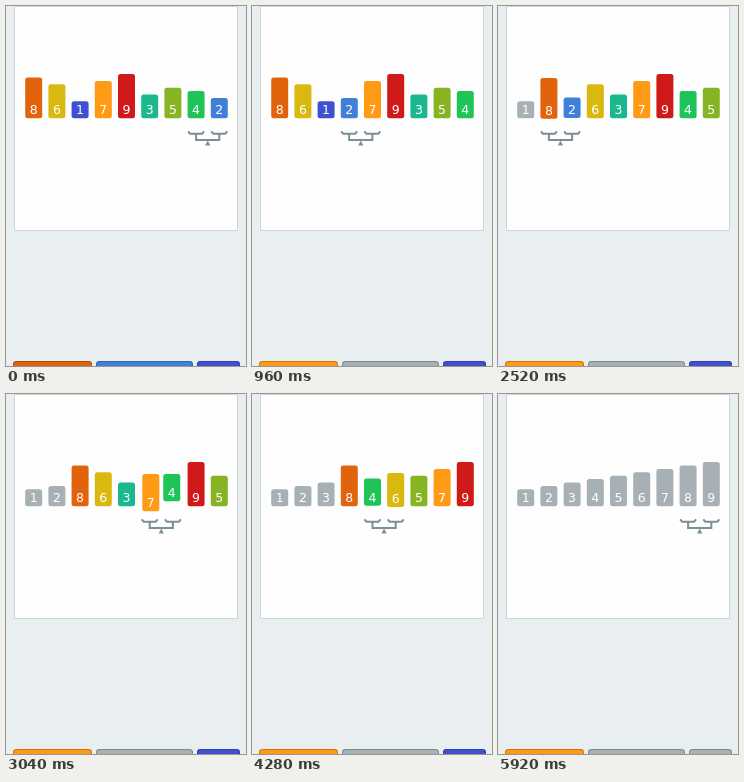
An HTML page with a canvas that plays this animation: 240 px wide and 360 px high, repeating every 6.52 s.

```html
<!DOCTYPE html>
<html lang="en">
<head>
<meta charset="utf-8">
<title>Bubble sort</title>
<style>
  html, body { margin: 0; width: 100%; height: 100%; overflow: hidden; background: #e9eef0; }
  canvas { display: block; }
</style>
</head>
<body>
<canvas id="stage"></canvas>
<script>
const LOOP = 6520, STEP = 40, END = 5920;
const SWAP = 118, MOVE = 82;
const PASS_STARTS = [38, 1548, 2729, 3690, 4569, 5148, 5525, 5822];
const PITCH = 23.2, FIRST = 27.7, BAR_WIDTH = 17, FLOOR = 112.3;
const GREY = '#a7b0b5', SCALE = '#7b8f94';
const COLORS = ['#4150d0', '#4080d8', '#1bb88f', '#1fc458', '#86b423',
                '#d9b90f', '#ff9a14', '#e1640c', '#d01a1a'];

const canvas = document.getElementById('stage');
const ctx = canvas.getContext('2d');
const ratio = window.devicePixelRatio || 1;
canvas.width = 240 * ratio;
canvas.height = 360 * ratio;
canvas.style.width = '240px';
canvas.style.height = '360px';
ctx.scale(ratio, ratio);

const ease = p => (1 - Math.cos(Math.PI * Math.min(1, p))) / 2;
const slotX = i => FIRST + PITCH * i;

// Bubble sort from the right, recorded as timed events.
function record(bars) {
  const events = [];
  let at = 0, done = 0;
  const add = (span, from, to, swap = false) => {
    events.push({ at, span, from, to, swap, done, bars: [...bars] });
    at += span;
  };
  add(PASS_STARTS[0], 7, 7);
  PASS_STARTS.forEach((start, pass) => {
    for (let i = 7; i >= pass; i--) {
      if (bars[i] > bars[i + 1]) {
        add(SWAP, i, i, true);
        [bars[i], bars[i + 1]] = [bars[i + 1], bars[i]];
      }
      if (i > pass) add(MOVE, i, i - 1);
    }
    done++;
    add((PASS_STARTS[pass + 1] || END) - at, pass, 7);
  });
  done = 9;
  add(LOOP - END, 7, 7);
  return events;
}

const events = record([8, 6, 1, 7, 9, 3, 5, 4, 2]);

function box(x, y, w, h, r, color) {
  ctx.fillStyle = color;
  ctx.beginPath();
  ctx.roundRect(x, y, w, h, r);
  ctx.fill();
}

function drawBar(value, x, lift, done) {
  const height = 13.6 + 3.4 * value, bottom = FLOOR + lift;
  box(x - BAR_WIDTH / 2, bottom - height, BAR_WIDTH, height, 2.5,
      value <= done ? GREY : COLORS[value - 1]);
  ctx.fillStyle = '#fff';
  ctx.fillText(value, x, bottom - 4);
}

function drawScale(x) {
  const arm = PITCH / 2;
  ctx.strokeStyle = ctx.fillStyle = SCALE;
  ctx.lineWidth = 2;
  ctx.beginPath();
  for (const pan of [x - arm, x + arm]) {
    ctx.moveTo(pan - 8, 125.3);
    ctx.lineTo(pan - 6, 127.7);
    ctx.lineTo(pan + 6, 127.7);
    ctx.lineTo(pan + 8, 125.3);
  }
  ctx.moveTo(x - arm, 128);
  ctx.lineTo(x - arm, 134);
  ctx.lineTo(x + arm, 134);
  ctx.lineTo(x + arm, 128);
  ctx.stroke();
  ctx.beginPath();
  ctx.moveTo(x, 134.5);
  ctx.lineTo(x - 2.6, 139.5);
  ctx.lineTo(x + 2.6, 139.5);
  ctx.fill();
}

function drawButton(x, width, color) {
  box(x, 355, width, 30, 3, color);
  ctx.strokeStyle = 'rgba(0,0,0,.22)';
  ctx.lineWidth = 1;
  ctx.beginPath();
  ctx.roundRect(x + .5, 355.5, width - 1, 29, 3);
  ctx.stroke();
}

function draw(t) {
  const now = events.findLast(e => e.at <= t);
  const p = ease((t - now.at) / now.span);

  ctx.fillStyle = '#e9eef0';
  ctx.fillRect(0, 0, 240, 360);
  ctx.fillStyle = '#fefefe';
  ctx.fillRect(8, 0, 224, 225);
  ctx.strokeStyle = '#d0d5d7';
  ctx.lineWidth = 1;
  ctx.strokeRect(8.5, .5, 223, 224);

  ctx.font = '500 12.5px "DejaVu Sans", sans-serif';
  ctx.textAlign = 'center';
  now.bars.forEach((value, i) => {
    const side = now.swap ? { [now.from]: -1, [now.from + 1]: 1 }[i] || 0 : 0;
    const radius = side * PITCH / 2, angle = Math.PI * p;
    drawBar(value, slotX(i) + radius * (Math.cos(angle) - 1),
            -radius * Math.sin(angle), now.done);
  });
  drawScale(slotX(now.from + (now.to - now.from) * p + .5));

  const started = t >= 80;
  drawButton(7, 79, started ? '#ff9a14' : COLORS[7]);
  drawButton(90, 97, started ? GREY : COLORS[1]);
  drawButton(191, 43, t >= END ? GREY : COLORS[0]);
}

const began = performance.now();
function tick() {
  const t = (performance.now() - began) % LOOP;
  draw(Math.floor(t / STEP) * STEP);
  requestAnimationFrame(tick);
}
tick();
</script>
</body>
</html>
```
